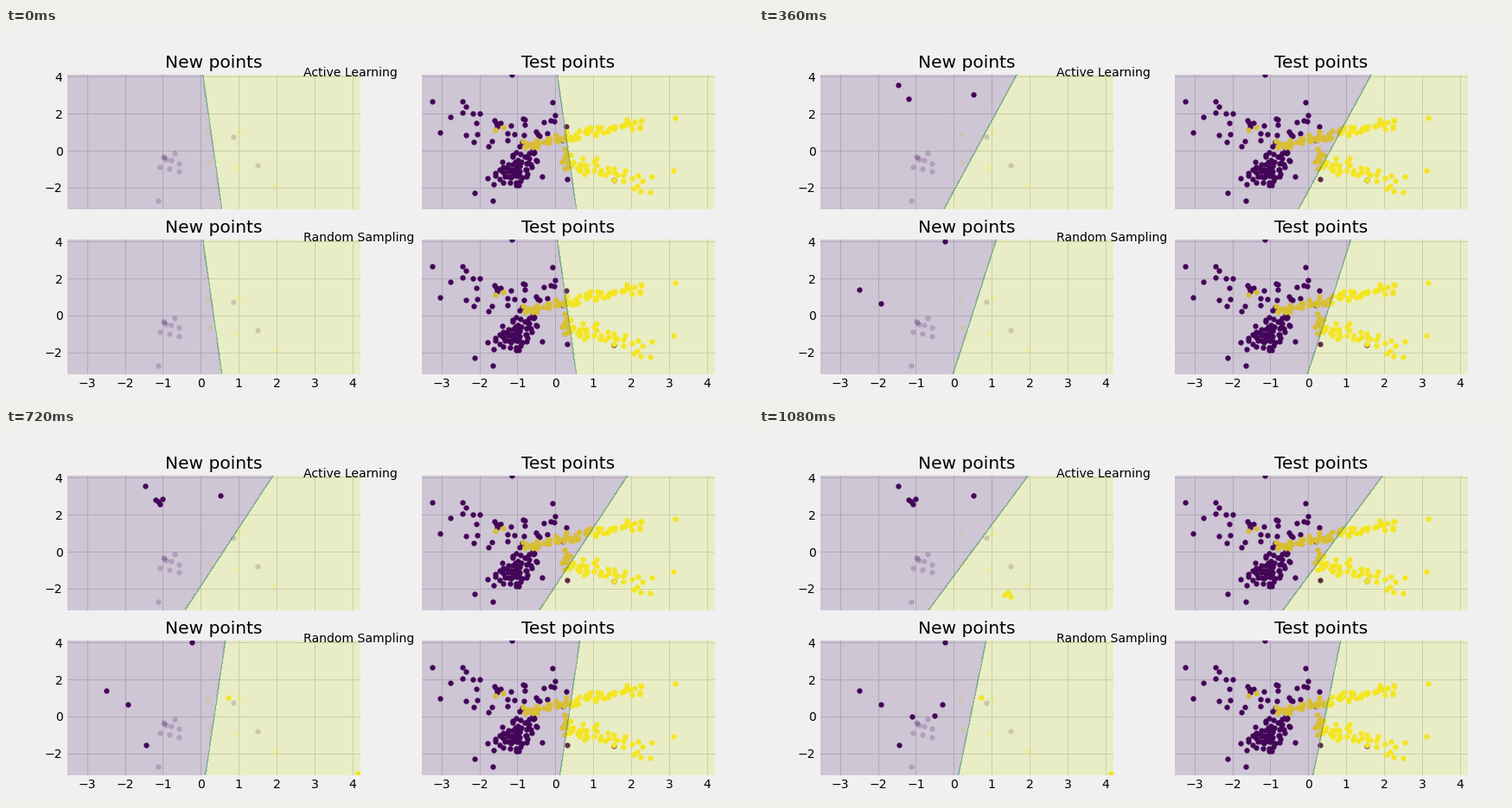
Animation, 864 px wide and 432 px high, one loop 1.2 s. Source, as a matplotlib script:

```python
import matplotlib.pyplot as plt
import numpy as np
from matplotlib.animation import ArtistAnimation

BG = "#f0f0f0"
DARK, YELLOW = "#440154", "#fde725"
XLIM, YLIM = (-3.56, 4.227), (-3.21, 4.215)
Y_TOP, Y_BOTTOM = 4.11, -3.18
STEPS, INTERVAL = 10, 120

plt.rcParams.update({
    "font.family": "DejaVu Sans", "font.size": 14,
    "figure.facecolor": BG, "axes.facecolor": BG, "axes.edgecolor": BG,
    "axes.linewidth": 3, "axes.titlesize": "x-large", "axes.axisbelow": True,
    "axes.grid": True, "grid.color": "#cbcbcb", "grid.linewidth": 1,
    "xtick.major.size": 0, "ytick.major.size": 0,
})

rng = np.random.default_rng(7)


def cloud(x, mid, slope, noise):
    """Points along y = mid + slope * x with normal scatter."""
    return np.column_stack([x, mid + slope * x + rng.normal(0, noise, len(x))])


def spread(start, end, n, power=1, jitter=.05):
    """Spaced values from start to end, denser at the start if power > 1."""
    return (start + (end - start) * np.linspace(0, 1, n) ** power
            + rng.normal(0, jitter, n))


# Labelled points known from the start
start_dark = np.vstack([
    cloud(spread(-1.07, -.56, 9, jitter=.04), -.3, .25, .5),
    [(-1.12, -2.7), (.85, .77), (1.5, -.81)]])
start_yellow = [(.17, .88), (1.02, .98), (.95, -.94), (.21, -.65),
                (1.93, -1.85)]

# Test set: a dense core below a loose halo, and two yellow arms
test_dark = np.vstack([
    cloud(rng.normal(-.98, .32, 74), -.25, .6, .48),
    cloud(spread(-2.6, .2, 36, jitter=.1), 1.4, -.05, .6),
    [(-3.24, 2.66), (-3.05, .98), (-1.14, 4.11), (-2.12, -2.27),
     (-1.65, -2.7), (.31, -1.54), (1.54, -1.57)]])
test_yellow = np.vstack([
    cloud(spread(-.8, 2.3, 66, 1.1), .61, .41, .15),
    cloud(spread(.25, 2.5, 48, 1.7), -.3, -.58, .33),
    [(3.16, 1.78), (3.11, -1.07), (-1.59, 1.12), (-1.37, 1.26)]])

# One queried point (x, y, yellow?) per step, and key positions of the
# decision line: step, x at Y_TOP, x at Y_BOTTOM
ACTIVE = {
    "name": "Active Learning", "baseline": 56,
    "queries": [(.52, 3.04, 0), (-1.47, 3.55, 0), (-1.19, 2.81, 0),
                (-1.0, 2.85, 0), (-1.12, 2.72, 0), (-1.08, 2.57, 0),
                (1.5, -2.42, 1), (1.33, -2.31, 1), (1.42, -2.21, 1)],
    "line": [(0, .057, .558), (1, 1.447, -.125), (4, 1.767, -.33),
             (6, 1.903, -.42), (9, 1.96, -.672)],
}
RANDOM = {
    "name": "Random Sampling", "baseline": 247,
    "queries": [(-1.92, .64, 0), (-.23, 4.0, 0), (-2.49, 1.4, 0),
                (4.13, -3.08, 1), (-1.44, -1.54, 0), (.72, 1.03, 1),
                (-.31, .67, 0), (-1.1, -.02, 0), (-.51, .04, 0)],
    "line": [(0, .057, .558), (1, .194, .49), (2, 1.117, -.011),
             (5, 1.14, -.034), (6, .65, .125), (7, .786, .11),
             (9, .855, .125)],
}

xx, yy = np.meshgrid(np.arange(*XLIM, .02), np.arange(*YLIM, .02))
LEVELS = np.linspace(0, 1.05, 8)


def dots(ax, pts, color, **kw):
    x, y = np.transpose(pts)
    return ax.scatter(x, y, s=40, linewidths=0, c=color, **kw)


def regions(ax, line, step):
    keys, tops, bottoms = zip(*line)
    top, bottom = (np.interp(step, keys, v) for v in (tops, bottoms))
    edge = top + (bottom - top) * (Y_TOP - yy) / (Y_TOP - Y_BOTTOM)
    return ax.contourf(xx, yy, (xx > edge).astype(float), LEVELS,
                       cmap="viridis", alpha=.2)


fig, axes = plt.subplots(2, 2, figsize=(12, 6), dpi=72,
                         sharex=True, sharey=True)
fig.subplots_adjust(left=.08, right=.95, bottom=.07, top=.88,
                    wspace=.2, hspace=.2)
axes[0, 0].set(xlim=XLIM, ylim=YLIM, xticks=range(-3, 5),
               yticks=range(-2, 5, 2))

frames = [[] for _ in range(STEPS)]
for (left, right), method in zip(axes, (ACTIVE, RANDOM)):
    left.set_title("New points")
    right.set_title("Test points")
    fig.text(343.7 / 864, 1 - method["baseline"] / 432, method["name"])
    dots(left, start_dark, DARK, alpha=.2)
    dots(left, start_yellow, YELLOW, alpha=.2)
    dots(right, test_dark, DARK)
    dots(right, test_yellow, YELLOW)
    for step, artists in enumerate(frames):
        for x, y, yellow in method["queries"][:step]:
            artists.append(dots(left, [(x, y)], YELLOW if yellow else DARK))
        for ax in (left, right):
            artists.append(regions(ax, method["line"], step))

anim = ArtistAnimation(fig, frames, interval=INTERVAL, repeat=True,
                       repeat_delay=0, blit=False)
plt.show()
```
